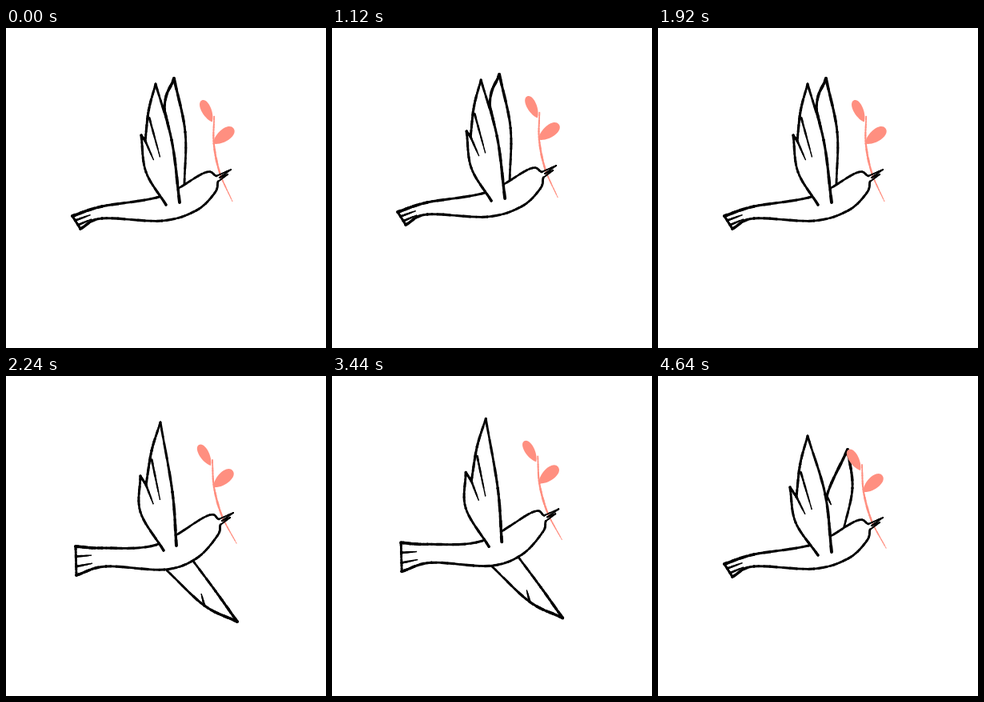
Animation, 400 px wide and 400 px high, one loop 4720 ms. Source, as an HTML page with a canvas:

```html
<!DOCTYPE html>
<html lang="en">
<head>
<meta charset="utf-8">
<title>Bird with a twig</title>
<style>
html, body { margin: 0; height: 100%; overflow: hidden; background: #fff; }
canvas { display: block; width: 100vw; height: 100vh; }
</style>
</head>
<body>
<canvas width="400" height="400"></canvas>
<script>
const ctx = document.querySelector('canvas').getContext('2d');
const STEP = 80, STEPS = 59, INK = '#000', PINK = '#ff8f80';

// Key points as x,y pairs; feathers, beak, tail and twig are derived from them.
// body: tail top, rump, shoulder, head, breast, belly, vent, tail bottom
// near: root, front edge, tip, notch, small tip, rear edge, rear root
// far:  root, front edge, tip, rear edge, rear root
const up = {
  body: [83,235, 120,223, 195,210, 263,185, 238,228, 195,241, 120,238, 93,251],
  near: [217,218, 207,140, 187,70, 174,141, 169,134, 175,180, 200,221],
  far: [223,195, 224,130, 210,63, 198,101, 205,200],
  sway: [4]
};
const down = {
  body: [81,227, 120,208, 190,188, 260,177, 243,206, 195,213, 115,229, 89,245],
  near: [218,197, 236,260, 275,315, 216,298, 222,306, 193,262, 190,211],
  far: [246,205, 278,250, 284,304, 254,281, 225,225],
  sway: [9]
};
const glide = {
  body: [87,213, 120,215, 188,211, 266,179, 238,228, 198,242, 125,238, 88,249],
  near: [213,212, 208,145, 193,58, 175,136, 168,125, 168,170, 197,218],
  far: [233,230, 262,269, 289,307, 248,287, 201,243],
  sway: [0]
};
const lift = {
  ...up,
  near: [217,220, 209,148, 187,75, 173,151, 165,139, 172,183, 200,224],
  far: [232,192, 243,140, 237,92, 211,150, 208,200],
  sway: [0]
};
const reach = { ...lift, far: [233,222, 280,250, 316,282, 262,272, 205,238] };
const stretch = pts => pts.map((v, i) => i % 2 ? 205 + (v - 205) * 1.11 : v);
const low = { ...down, near: stretch(down.near), far: stretch(down.far) };

// step, pose, rise or fall: two wing beats, then a glide
const keys = [];
for (const s of [0, 12])
  keys.push([s, up, 0], [s + 2, up, -5], [s + 6, low, 0], [s + 8, down, 0]);
keys.push([24, up, 0], [25, lift, 0], [26, reach, 0], [28, glide, 0], [35, glide, -18],
  [49, glide, 4], [51, glide, 4], [56, reach, 0], [58, lift, 0], [59, up, 0]);

const mix = (a, b, u) => a + (b - a) * u;
const between = (p, q, u) => [mix(p[0], q[0], u), mix(p[1], q[1], u)];
const shift = (p, x, y) => [p[0] + x, p[1] + y];

// Smooth curve through the points
function curve(pts) {
  const last = pts.length - 1, out = [];
  const at = i => i < 0 ? between(pts[1], pts[0], 2)
    : i > last ? between(pts[last - 1], pts[last], 2) : pts[i];
  for (let i = 0; i < last; i++)
    for (let u = 0; u < 1; u += 0.1)
      out.push([0, 1].map(axis => {
        const [o, p, q, r] = [-1, 0, 1, 2].map(k => at(i + k)[axis]);
        const m = (q - o) / 2, k = (r - p) / 2;
        return p + u * (m + u * (3 * (q - p) - 2 * m - k + u * (2 * (p - q) + m + k)));
      }));
  return [...out, pts[last]];
}

// Brush line whose width runs from w0 over w1 to w2
function brush(pts, [w0, w1, w2], color = INK) {
  const line = curve(pts);
  ctx.strokeStyle = color;
  for (let i = 1; i < line.length; i++) {
    const u = 2 * i / line.length;
    const width = u < 1 ? mix(w0, w1, u) : mix(w1, w2, u - 1);
    ctx.lineWidth = width * (1 + 0.1 * Math.sin(i * 1.9));
    ctx.beginPath();
    ctx.moveTo(...line[i - 1]);
    ctx.lineTo(...line[i]);
    ctx.stroke();
  }
}

function fill(...edges) {
  ctx.fillStyle = '#fff';
  ctx.beginPath();
  for (const p of edges.flatMap(curve)) ctx.lineTo(...p);
  ctx.fill();
}

const vane = (from, to, length) => brush([from, between(from, to, length)], [2.8, 2.2, 1]);

function farWing([root, edge, tip, rear, rearRoot]) {
  const front = [root, edge, tip], back = [tip, rear, rearRoot];
  fill(front, back);
  brush(front, [2.6, 3, 3.6]);
  brush(back, [3.6, 3.2, 2.4]);
  vane(rear, root, 0.25);
}

function nearWing([root, edge, tip, notch, smallTip, rear, rearRoot]) {
  const base = between(root, rearRoot, 0.5);
  const front = [root, edge, tip], back = [smallTip, rear, rearRoot];
  const trail = [tip, between(edge, between(tip, notch, 0.5), 1.08), notch];
  fill(front, trail, back);
  brush(front, [3.6, 3.2, 2.6]);
  brush(trail, [2.6, 3.2, 2.8]);
  brush(back, [3, 2.8, 3.2]);
  brush([smallTip, notch], [2.8, 2.8, 2.8]);
  vane(notch, base, 0.3);
  vane(between(tip, notch, 0.6), base, 0.45);
}

function torso([tailTop, rump, shoulder, head, breast, belly, vent, tailEnd]) {
  const chin = shift(head, 2, 7);
  const spine = [tailTop, rump, shoulder, shift(head, -15, -4), head];
  const under = [chin, shift(head, -2, 21), breast, belly, vent, tailEnd];
  fill(spine, under);
  brush(spine, [3.8, 2.8, 2.4]);
  brush(under, [2.6, 2.8, 3.4]);
  brush([tailTop, tailEnd], [3, 2.8, 3]);
  for (const f of [0.35, 0.7])
    vane(between(tailTop, tailEnd, f), between(rump, vent, f), 0.55);
  const beak = [head, shift(head, 18, -8), shift(head, 4, 2), shift(head, 14, -2), chin];
  for (let i = 0; i < 4; i++) brush([beak[i], beak[i + 1]], [1.9, 1.7, 1.9]);
}

function leaf(x, y, length, width, angle) {
  ctx.save();
  ctx.translate(x, y);
  ctx.rotate(angle);
  ctx.fillStyle = PINK;
  ctx.beginPath();
  ctx.moveTo(0, 0);
  ctx.bezierCurveTo(length * 0.3, -width * 0.68, length, -width * 0.68, length, 0);
  ctx.bezierCurveTo(length, width * 0.68, length * 0.3, width * 0.68, 0, 0);
  ctx.fill();
  ctx.restore();
}

function twig(head, degrees) {
  ctx.save();
  ctx.translate(...head);
  ctx.rotate(degrees * Math.PI / 180);
  brush([[-8, -74], [-6, -40], [4, -4], [22, 30]], [1.6, 2.6, 0.8], PINK);
  leaf(-10, -67, 30, 12, -2.09);
  leaf(-7, -40, 32, 15, -0.71);
  ctx.restore();
}

function poseAt(step) {
  const i = keys.findIndex(k => k[0] > step);
  const [s0, a, y0] = keys[i - 1], [s1, b, y1] = keys[i];
  const t = (step - s0) / (s1 - s0), u = t * t * (3 - 2 * t);
  const dy = mix(y0, y1, u), pose = { sway: mix(a.sway[0], b.sway[0], u) };
  for (const part of ['body', 'near', 'far']) {
    pose[part] = [];
    for (let j = 0; j < a[part].length; j += 2)
      pose[part].push(shift(between(a[part].slice(j), b[part].slice(j), u), dy / 6, dy));
  }
  return pose;
}

function draw(step) {
  const { body, near, far, sway } = poseAt(step);
  ctx.fillStyle = '#fff';
  ctx.fillRect(0, 0, 400, 400);
  ctx.lineCap = 'round';
  farWing(far);
  twig(body[3], sway);
  torso(body);
  nearWing(near);
}

const start = performance.now();
function tick() {
  draw(Math.floor((performance.now() - start) / STEP) % STEPS);
  requestAnimationFrame(tick);
}
tick();
</script>
</body>
</html>
```
